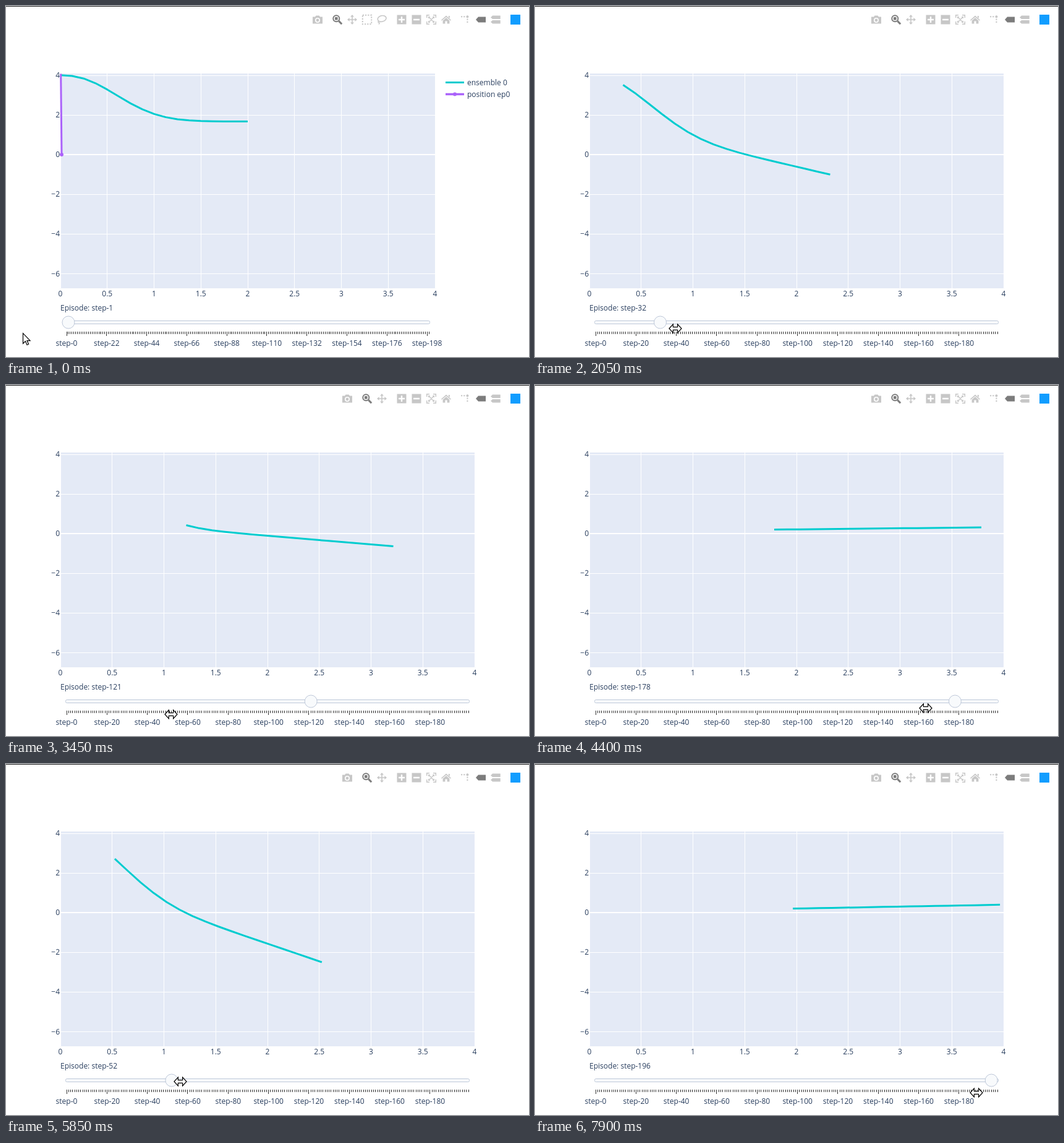
Animation of 846x567 px, one loop 8 s. Source, as an HTML page:

```html
<!DOCTYPE html>
<html lang="en">
<head>
<meta charset="utf-8">
<title>Step slider chart</title>
<style>
html, body { margin: 0; width: 100%; height: 100%; overflow: hidden; background: #fff; }
svg { display: block; font: 12px "Open Sans", sans-serif; }
text { fill: #2a3f5f; }
.mid { text-anchor: middle; }
.end { text-anchor: end; }
.crisp { shape-rendering: crispEdges; }
.icon { fill: #c7c7c7; stroke: none; }
.icon .ln { fill: none; stroke: #c7c7c7; stroke-width: 2; }
.dark { fill: #7c7c7c; }
.dark .ln { stroke: #7c7c7c; }
.cursor { fill: #fff; stroke: #000; stroke-width: 1.2; }
</style>
</head>
<body>
<svg width="846" height="567" viewBox="0 0 846 567">
  <rect width="846" height="567" fill="#fff"/>
  <rect width="846" height="1" fill="#222"/>
  <g id="wide"></g>
  <g id="narrow"></g>
  <path id="trace" fill="none" stroke="#00cccf" stroke-width="3" stroke-linejoin="round"/>
  <g id="marker">
    <path d="M88.7 109.5L90 240" stroke="#ab63fa" stroke-width="3"/>
    <circle cx="90" cy="240" r="3" fill="#ab63fa"/>
  </g>
  <text id="label" x="88" y="492"></text>
  <circle id="knob" cy="511" r="10" fill="#f8fafc" stroke="#bec8d9"/>
  <path id="arrow" class="cursor" d="M.5 .7V17.3L4.4 13.6L7 19.5L9.6 18.3L7 12.6H12Z"/>
  <path id="resize" class="cursor" d="M-10 0L-3.6 -7V-2.4H3.6V-7L10 0L3.6 7V2.4H-3.6V7Z"/>
</svg>
<script>
const $ = id => document.getElementById(id);
const LOOP = 8000, TICK = 50, RESIZE_AT = 1550;
const LEFT = 88, ZERO_Y = 240, UNIT_Y = 32.05, STEPS = 200, INSET = 10;

const layouts = {
  narrow: { right: 694, every: 22, bar: { camera: 504, zoom: 536, pan: 560, box: 584, lasso: 608 } },
  wide: { right: 758, every: 20, bar: { camera: 552, zoom: 584, pan: 608 } }
};
const sharedBar = { plus: 640, minus: 664, fit: 688, home: 712, spike: 742, tag: 768, tags: 792 };

const icons = {
  camera: '<path fill-rule="evenodd" d="M-8 -4.5h4l1.5 -2h5l1.5 2h4v11h-16zM4 1a4 4 0 1 0 -8 0a4 4 0 1 0 8 0z"/><circle cy="1" r="2.4"/>',
  zoom: '<circle class="ln" cx="-1.7" cy="-1.7" r="5"/><path d="M-4 -4h4.6v4.6h-4.6z"/><path class="ln" style="stroke-width:3" d="M2.4 2.4L7.2 7.2"/>',
  pan: '<path class="ln" style="stroke-width:1.6" d="M-6 0H6M0 -6V6"/><path d="M0 -8l3 3.6h-6zM0 8l3 -3.6h-6zM-8 0l3.6 -3v6zM8 0l-3.6 -3v6z"/>',
  box: '<path class="ln" stroke-dasharray="2.2 2" d="M-7.2 -7.2H7.2V7.2H-7.2Z"/>',
  lasso: '<ellipse class="ln" style="stroke-width:1.6" cx=".5" cy="-1.5" rx="7" ry="4.8" transform="rotate(-14)"/><path class="ln" style="stroke-width:1.6" d="M-5 2q-2 2 0 2.5t0 3"/>',
  plus: '<path fill-rule="evenodd" d="M-7.5 -7.5h15v15h-15zM-1.2 -5v3.8H-5v2.4h3.8V5h2.4V1.2H5v-2.4H1.2V-5z"/>',
  minus: '<path fill-rule="evenodd" d="M-7.5 -7.5h15v15h-15zM-5 -1.2v2.4H5v-2.4z"/>',
  fit: '<path class="ln" style="stroke-width:1.5" d="M-7.3 -3V-7.3H-3M3 -7.3H7.3V-3M7.3 3V7.3H3M-3 7.3H-7.3V3M-4 -4L4 4M4 -4L-4 4"/><path d="M-5 -5h3.4l-3.4 3.4zM5 -5v3.4l-3.4 -3.4zM5 5h-3.4l3.4 -3.4zM-5 5v-3.4l3.4 3.4z"/>',
  home: '<path d="M0 -6.5L8 .7L7 1.8L0 -4.3L-7 1.8L-8 .7ZM3.8 -6h2v4l-2 -1.8zM0 -3L5.4 1.8V6.5H1.6V2.5H-1.6V6.5H-5.4V1.8Z"/>',
  spike: '<path class="ln" stroke-dasharray="2.2 2" d="M-6 -4.8H2M4.4 -1.5V7"/><circle cx="4.4" cy="-4.8" r="2"/>',
  tag: '<path d="M-8 0l4 -4.4H8v8.8H-4z"/>',
  tags: '<path d="M-8 -3.5l3 -3H7.7v5.6H-5zM-8 3.7l3 -2.8H7.7v5.6H-5z"/>'
};

const rect = (x, y, w, h, fill) => `<rect x="${x}" y="${y}" width="${w}" height="${h}" fill="${fill}"/>`;
const text = (x, y, s, cls = '') => `<text x="${x}" y="${y}" class="${cls}">${s}</text>`;
const icon = ([name, x]) =>
  `<g class="icon ${name === 'zoom' || name === 'tag' ? 'dark' : ''}" transform="translate(${x} 22)">${icons[name]}</g>`;
const sliderX = (step, right) => LEFT + INSET + (right - LEFT - 2 * INSET) * step / (STEPS - 1);
const toY = value => ZERO_Y - value * UNIT_Y;

function buildLayout(name) {
  const { right, every, bar } = layouts[name], width = right - LEFT;
  let grid = rect(LEFT, 109, width, 347, '#e4eaf6'), labels = '', ticks = '';
  grid += rect(LEFT - 1, 109, 2, 347, '#fff');
  for (let i = 0; i <= 8; i++) {
    const x = LEFT + width * i / 8;
    if (i && i < 8) grid += rect(Math.floor(x), 109, 1, 347, '#fff');
    labels += text(x, 469, i / 2, 'mid');
  }
  for (let v = 4; v >= -6; v -= 2) {
    grid += v ? rect(LEFT, Math.round(toY(v)), width, 1, '#fff') : rect(LEFT, ZERO_Y - 1, width, 2, '#fff');
    labels += text(87, toY(v) + 4.2, v < 0 ? '−' + -v : v, 'end');
  }
  for (let i = 0; i < STEPS; i++) {
    const x = sliderX(i, right), major = i % every === 0;
    ticks += rect(Math.round(x - 0.5), 526, 1, major ? 7 : 4, '#333');
    if (major) labels += text(x, 549, 'step-' + i, 'mid');
  }
  const rail = `<rect x="96.5" y="508.5" width="${width - 17}" height="5" rx="2" fill="#f8fafc" stroke="#bec8d9"/>`;
  const buttons = Object.entries({ ...bar, ...sharedBar }).map(icon).join('') + rect(816, 14, 16, 16, '#119dff');
  $(name).innerHTML = `<g class="crisp">${grid}${ticks}</g>${labels}${rail}${buttons}`;
}
buildLayout('narrow');
buildLayout('wide');
$('narrow').innerHTML +=
  '<path d="M711 123.5h30" stroke="#00cccf" stroke-width="3"/>' +
  '<path d="M711 142.5h30" stroke="#ab63fa" stroke-width="3.5"/><circle cx="726" cy="142.5" r="3" fill="#ab63fa"/>' +
  text(746, 128, 'ensemble 0') + text(746, 147, 'position ep0');

// Turning points of the drag: the plotted step trails behind the pointer.
const stepKeys = [
  [0, 1], [1500, 1], [2050, 32], [2400, 42], [3150, 90], [3350, 130], [3450, 121], [3650, 34],
  [4050, 125], [4250, 125], [4300, 178], [4400, 178], [5100, 93], [5500, 67], [5600, 67],
  [5700, 46], [5850, 52], [6800, 135], [7300, 176], [7650, 195], [7800, 195], [7850, 196]
];
const pointerKeys = [
  [0, 27, 528], [250, 27, 528], [900, 104, 513], [1500, 104, 513], [2050, 227, 521],
  [3200, 540, 521], [3450, 267, 532], [3600, 207, 534], [4150, 681, 513], [4250, 681, 513],
  [4400, 632, 522], [5100, 370, 516], [5700, 246, 512], [5850, 282, 513],
  [6800, 594, 517], [7650, 738, 514], [7800, 738, 514], [7900, 714, 531]
];

// Interpolates the rows of keys by their first column.
function sample(keys, t) {
  const i = keys.findIndex(k => k[0] > t);
  if (i < 0) return keys[keys.length - 1].slice(1);
  const a = keys[i - 1], b = keys[i], f = (t - a[0]) / (b[0] - a[0]);
  return a.slice(1).map((v, j) => v + (b[j + 1] - v) * f);
}

// Position decays along a bell; a forecast starting at x0 adds an offset and a linear drift.
const fall = x => Math.exp(-((x / 0.77) ** 2.3));
function forecast(x0, u) {
  const f0 = fall(x0), f = fall(x0 + u);
  const offset = 1.47 * f0 ** 1.3 * (1 - f / f0);
  const drift = 0.14 * (1 - f0) - 228.5 * x0 ** 3.075 * Math.exp(-5.424 * x0);
  return 0.2 + 3.8 * f + offset + drift * u;
}

function tracePath(x0, unit) {
  const points = [];
  for (let u = 0; u <= 2; u += 0.125) {
    points.push(`${LEFT + (x0 + u) * unit} ${toY(forecast(x0, u))}`);
  }
  return 'M' + points.join('L');
}

const show = (id, on) => $(id).style.display = on ? '' : 'none';

function draw(time) {
  const t = Math.floor((time % LOOP + 0.01) / TICK) * TICK;
  const step = Math.round(sample(stepKeys, t)[0]);
  const [x, y] = sample(pointerKeys, t).map(Math.round);
  const early = t < RESIZE_AT, { right } = layouts[early ? 'narrow' : 'wide'];

  show('narrow', early);
  show('wide', !early);
  show('marker', early);
  $('trace').setAttribute('d', tracePath(early ? 0 : (step + 0.5) / 100, (right - LEFT) / 4));
  $('label').textContent = 'Episode: step-' + step;
  $('knob').setAttribute('cx', sliderX(step, right));

  const onKnob = x > 90;
  show('arrow', !onKnob);
  show('resize', onKnob);
  $(onKnob ? 'resize' : 'arrow').setAttribute('transform', `translate(${x} ${y})`);
}

const start = performance.now();
function loop() {
  draw(performance.now() - start);
  requestAnimationFrame(loop);
}
loop();
</script>
</body>
</html>
```
